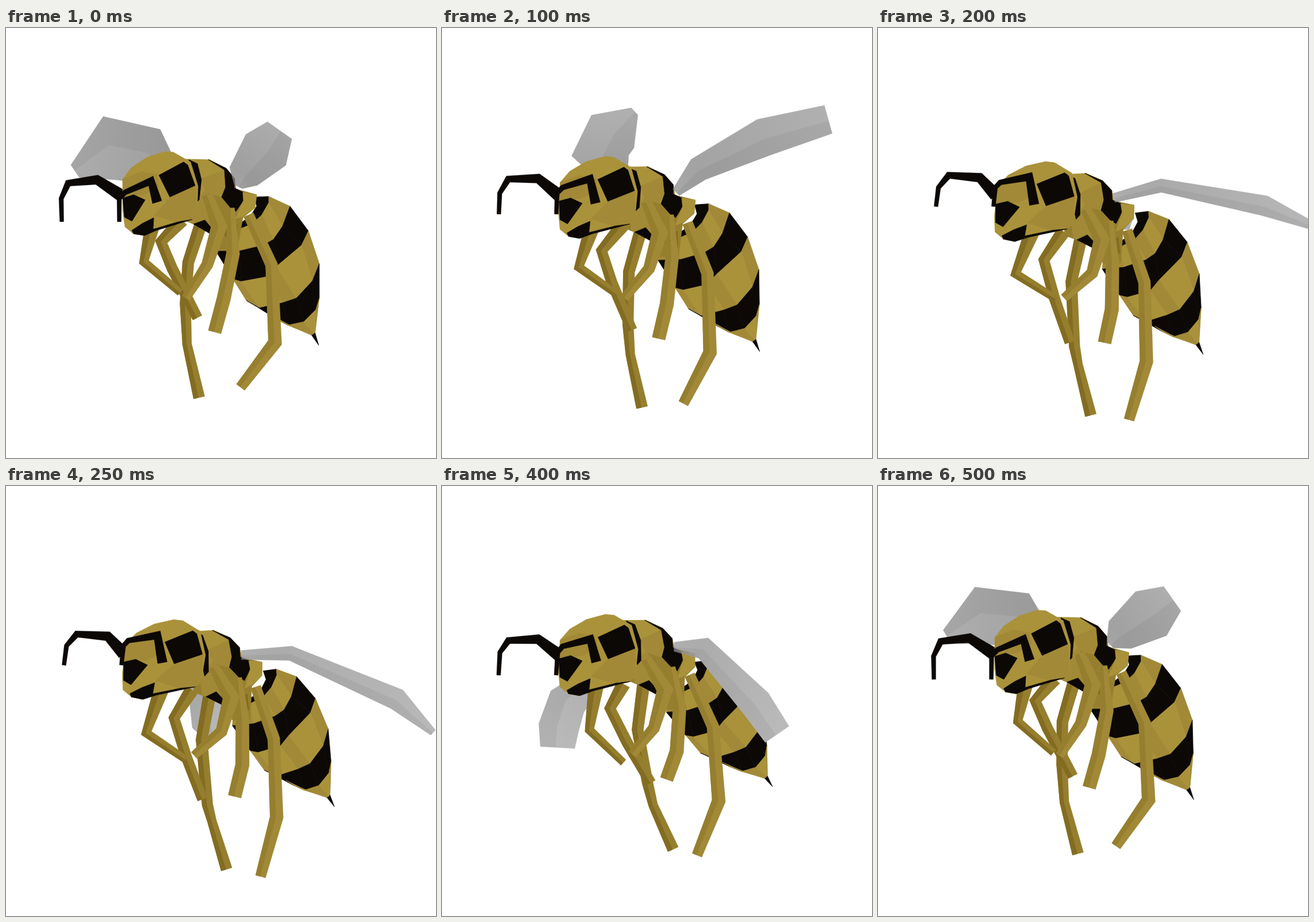
Animation, 748 px wide and 748 px high, one loop 550 ms. Source, as an HTML page with a canvas:

```html
<!DOCTYPE html>
<html lang="en">
<head>
<meta charset="utf-8">
<title>Flying wasp</title>
<style>
html, body { margin: 0; width: 100%; height: 100%; overflow: hidden; background: #fff; }
canvas { display: block; width: 100vw; height: 100vh; }
</style>
</head>
<body>
<canvas id="stage" width="748" height="748"></canvas>
<script>
const ctx = document.getElementById('stage').getContext('2d');
const STEP = 50, STEPS = 11;
const LIGHT = '#aa923b', MID = '#a18937', OLIVE = '#967e2f', DARK = '#836c22', BLACK = '#0c0806';

// Two shared rhythms drive the whole body: a rotating sway and a vertical bob.
const KEYS = [0, 2, 3, 5, 6, 8, 10];
const SWAY = [0, 0.27, 0.5, 0.82, 1, 0.88, 0.15];
const BOB = [0, 0.55, 1, 1, 0.5, 0.2, 0];

// Moving points: x, y, sway dx, dy, bob dx, dy (limbs add a width).
const headFrame = [[203,262, 2,4, 4,8], [308,234, 7,7, 10,13], [322,334, 3,5, 3,12]];
const thoraxFrame = [[354,230, -1,0, 8,22], [436,291, 3,-2, 7,18], [357,358, 17,-1, 8,24]];
const tailFrame = [[493,310, 2,2, 10,20], [531,534, 34,-38, -1,39], [395,437, 32,-11, 4,33]];

const farLegs = [
  [[341,335, 10,3, 5,26, 22], [317,408, 26,13, 2,23, 20], [312,480, 53,30, -5,50, 19], [315,550, 61,-2, -7,34, 16], [336,643, 79,-22, -17,42, 20]],
  [[306,334, 9,9, 10,13, 24], [270,372, 25,12, 2,22, 18], [289,418, 40,26, -8,32, 19], [333,504, 40,6, -24,36, 18]],
  [[256,338, 13,6, 5,7, 27], [240,407, 22,18, -14,8, 15], [303,460, 15,25, -3,-5, 13]]];
const nearLegs = [
  [[422,325, 9,-2, 5,26, 18], [462,412, 12,1, -6,27, 21], [468,547, 18,-7, -12,35, 23], [408,625, 40,9, 2,47, 18]],
  [[391,313, 8,-3, 6,23, 13], [395,392, 21,-13, -1,22, 23], [379,470, 32,-16, 6,28, 24], [363,529, 29,-29, 11,35, 23]],
  [[350,290, 4,8, 8,18, 18], [371,345, 18,7, 6,17, 27], [350,412, 19,9, 9,8, 20], [313,470, 21,-4, -3,2, 15]]];

const leftFeeler = [[97,337, 1,-4, 3,-22, 7], [96,297, 4,-5, 6,-15, 8], [108,270, 6,2, 10,-14, 11], [158,264, 7,4, 13,-6, 16], [203,293, 1,3, 1,-4, 22]];
const rightFeeler = [
  [197,337, 1,-4, 3,-22, 7], [197,297, 4,-5, 4,-15, 8],
  [207,286, 2,-5, 4,-13, 9], [252,266, 5,2, 7,-8, 14], [263,303, 5,3, 5,2, 17]];

// Wing strokes: elbow, outer joint and tip, then chord and tip width.
const nearRoot = [404,276, -2,0, 7,18], farRoot = [310,282, 0,2, 8,20];
const nearWing = [
  [413,258, 452,212, 476,178, 88,52], [446,246, 560,190, 672,159, 66,51],
  [482,256, 640,243, 752,255, 36,20], [495,291, 680,371, 743,429, 38,12],
  [482,293, 610,398, 662,475, 26,18], [455,282, 546,378, 583,432, 56,50],
  [421,259, 475,222, 512,196, 94,52]];
const farWing = [
  [245,222, 180,209, 120,249, 104,26], [275,222, 297,180, 335,145, 92,17],
  [370,256, 430,245, 478,240, 32,9], [350,380, 355,412, 365,436, 64,36],
  [285,380, 284,445, 284,491, 92,62], [218,375, 203,420, 201,455, 70,60],
  [245,232, 180,226, 120,262, 98,26]];

// Edges of the abdomen rings, from the back round to the belly.
const rings = [
  [432,294, 436,310, 425,327, 410,338, 400,342, 380,345],
  [457,293, 457,304, 445,325, 428,341, 400,352, 370,358],
  [494,310, 481,345, 465,368, 447,378, 405,388, 365,388],
  [526,353, 514,378, 470,415, 452,433, 409,441, 395,437],
  [545,410, 533,440, 505,470, 481,478, 440,487, 418,474],
  [545,470, 539,490, 518,511, 490,517, 470,506, 457,496],
  [538,528, 537,530, 535,532, 533,533, 531,534, 500,521]];
const sting = [[BLACK, 530,532, 537,528, 544,552]];

const thorax = [
  [OLIVE, 305,235, 354,229, 383,244, 398,262, 400,280, 436,290, 433,313, 412,330, 402,386, 370,385, 356,358, 328,342, 305,332],
  [MID, 318,290, 350,285, 362,330, 350,350, 320,338],
  [DARK, 384,350, 402,342, 402,370, 376,360],
  [LIGHT, 312,228, 354,229, 381,246, 382,278, 375,294, 345,284, 326,300],
  [MID, 340,262, 380,247, 382,278, 372,293, 346,284],
  [BLACK, 318,229, 333,236, 340,264, 336,299, 328,306],
  [BLACK, 352,229, 383,244, 398,262, 397,278, 413,286, 413,300, 400,319, 390,312, 375,294, 382,277, 380,247],
  [LIGHT, 412,286, 436,290, 433,313, 412,328, 399,332, 413,300],
  [BLACK, 326,341, 346,334, 359,350, 357,359]];
const head = [
  [LIGHT, 203,263, 218,243, 245,225, 276,215, 291,216, 312,228, 321,233, 334,275, 332,325, 322,334, 262,350, 240,361, 222,358, 207,346, 203,318],
  [MID, 203,263, 235,250, 262,254, 266,275, 240,290, 204,294],
  [MID, 285,295, 330,275, 332,325, 322,334, 300,338, 258,326],
  [BLACK, 266,256, 309,233, 316,238, 329,274, 285,294],
  [BLACK, 203,296, 222,290, 242,299, 219,336, 206,329],
  [BLACK, 219,352, 237,340, 257,330, 256,350, 300,337, 324,333, 262,352, 241,361, 222,358]];

let sway, bob;

// Smooth cyclic interpolation over unevenly spaced keys.
function blend(values, s) {
  const n = KEYS.length;
  const time = k => KEYS[(k + n) % n] + STEPS * Math.floor(k / n);
  const value = k => values[(k + n) % n];
  let i = n - 1;
  while (KEYS[i] > s) i--;
  const t0 = time(i), d = time(i + 1) - t0, u = (s - t0) / d;
  const a = value(i), b = value(i + 1);
  const m0 = (b - value(i - 1)) / (time(i + 1) - time(i - 1)) * d;
  const m1 = (value(i + 2) - a) / (time(i + 2) - t0) * d;
  return a + u * (m0 + u * (3 * (b - a) - 2 * m0 - m1 + u * (2 * (a - b) + m0 + m1)));
}

const place = ([x, y, wx, wy, bx, by]) => [x + wx * sway + bx * bob, y + wy * sway + by * bob];

function pairs(list) {
  const out = [];
  for (let i = 0; i < list.length; i += 2) out.push([list[i], list[i + 1]]);
  return out;
}

function poly(points, fill, edge = 0.7) {
  ctx.beginPath();
  points.forEach(p => ctx.lineTo(...p));
  ctx.closePath();
  ctx.fillStyle = ctx.strokeStyle = fill;
  ctx.fill();
  if (edge) { ctx.lineWidth = edge; ctx.stroke(); }
}

// Affine map carrying a part's resting triangle onto its current one.
function mapper(frame) {
  const [a, b, c] = frame, [A, B, C] = frame.map(place);
  const ux = b[0] - a[0], uy = b[1] - a[1], vx = c[0] - a[0], vy = c[1] - a[1];
  const det = ux * vy - uy * vx;
  return ([x, y]) => {
    const dx = x - a[0], dy = y - a[1];
    const p = (dx * vy - dy * vx) / det, q = (ux * dy - uy * dx) / det;
    return [0, 1].map(k => A[k] + p * (B[k] - A[k]) + q * (C[k] - A[k]));
  };
}

function rigid(parts, frame) {
  const map = mapper(frame);
  for (const [fill, ...p] of parts) poly(pairs(p).map(map), fill);
}

function abdomen() {
  rigid(sting, tailFrame);
  const map = mapper(tailFrame);
  const edges = rings.map(r => pairs(r).map(map));
  for (let i = 0; i + 1 < edges.length; i++) {
    const a = edges[i], b = edges[i + 1];
    for (let j = 0; j + 1 < a.length; j++) {
      const fill = i % 2 ? (j % 2 ? LIGHT : MID) : BLACK;
      poly([a[j], a[j + 1], b[j + 1], b[j]], fill);
    }
  }
}

// Tapered limb through joints p, with one shaded side.
function limb(p, w, fill, side) {
  const n = w.length, left = [], mid = [], right = [];
  const dir = i => Math.atan2(p[i + 1][1] - p[i][1], p[i + 1][0] - p[i][0]);
  p.forEach(([x, y], i) => {
    const a = dir(Math.max(i - 1, 0)), b = dir(Math.min(i, n - 2));
    const half = Math.atan2(Math.sin(b - a), Math.cos(b - a)) / 2;
    const r = w[i] / 2 / Math.max(Math.cos(half), 0.75);
    const dx = -Math.sin(a + half) * r, dy = Math.cos(a + half) * r;
    left.push([x + dx, y + dy]);
    mid.push([x + dx * 0.1, y + dy * 0.1]);
    right.unshift([x - dx, y - dy]);
  });
  poly(left.concat(right), fill, 0.3);
  if (side) poly(left.concat(mid.reverse()), side, 0);
}

const jointed = (joints, fill, side) => limb(joints.map(place), joints.map(j => j[6]), fill, side);

function wing(rows, root, s) {
  const v = rows[0].map((_, k) => blend(rows.map(r => r[k]), s));
  const chord = Math.max(v[6], 8), tip = Math.max(v[7], 5);
  const p = [place(root), ...pairs(v.slice(0, 6))];
  const g = Math.round(168 + 16 * sway);
  const tone = (d, alpha = 1) => `rgba(${g + d},${g + d},${g + d},${alpha})`;
  const fill = ctx.createLinearGradient(...p[0], ...p[3]);
  fill.addColorStop(0, tone(-40, 0.7));
  fill.addColorStop(0.25, tone(-8));
  fill.addColorStop(1, tone(4));
  limb(p, [16, chord * (rows === farWing ? 0.95 : 0.65), chord, tip], fill, 'rgba(70,66,62,.07)');
}

function draw(s) {
  sway = blend(SWAY, s);
  bob = blend(BOB, s);
  ctx.fillStyle = '#fff';
  ctx.fillRect(0, 0, 748, 748);
  wing(farWing, farRoot, s);
  jointed(leftFeeler, BLACK);
  farLegs.forEach(l => jointed(l, OLIVE, DARK));
  abdomen();
  rigid(thorax, thoraxFrame);
  nearLegs.forEach(l => jointed(l, MID, OLIVE));
  rigid(head, headFrame);
  jointed(rightFeeler, BLACK);
  wing(nearWing, nearRoot, s);
}

const start = performance.now();
let shown = -1;
function tick() {
  const s = Math.floor((performance.now() - start) / STEP) % STEPS;
  if (s !== shown) draw(shown = s);
  requestAnimationFrame(tick);
}
tick();
</script>
</body>
</html>
```
